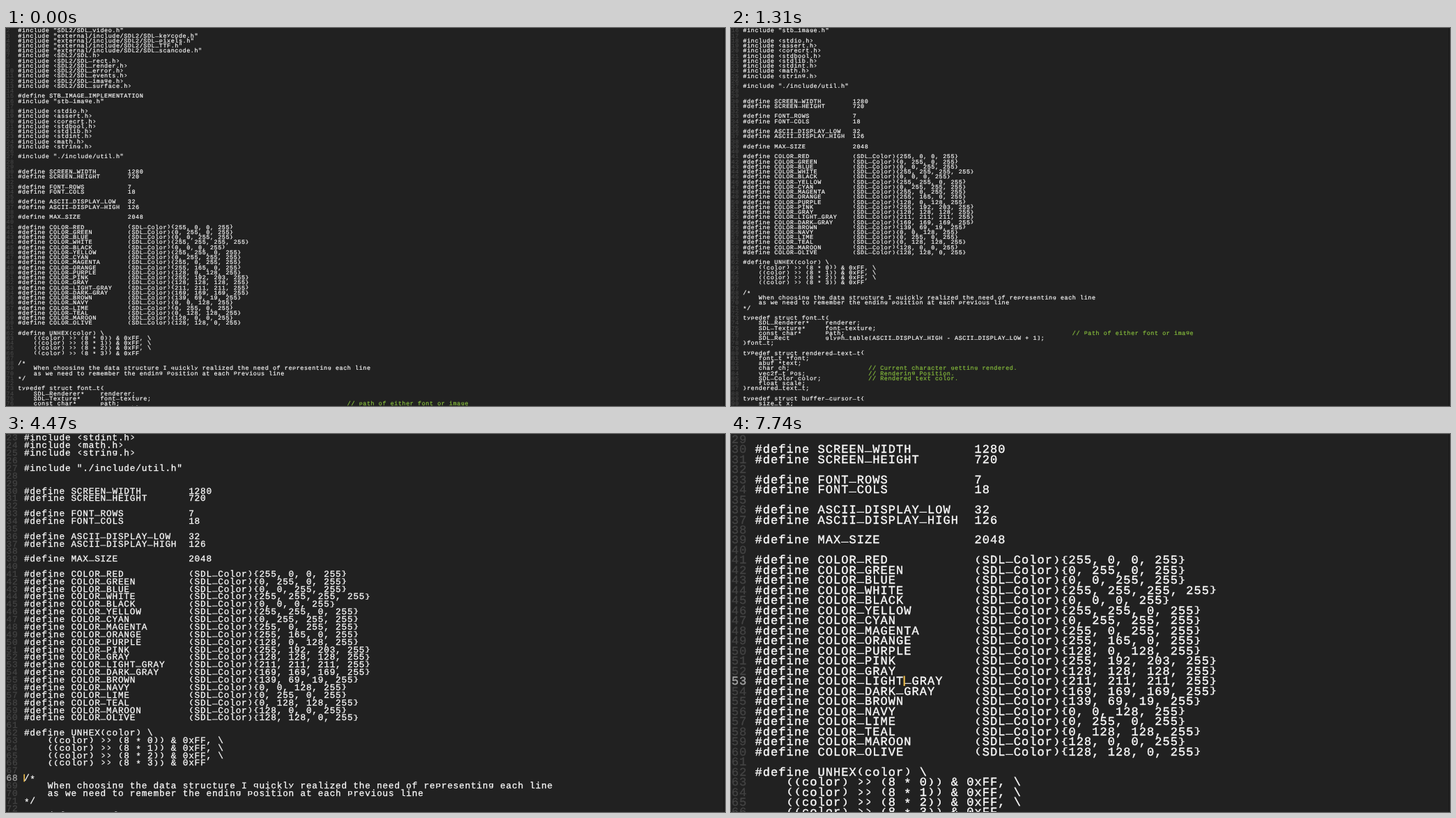
These frames come from a looping animation (1032 px wide and 543 px high, 8000 ms). An HTML page:

```html
<!DOCTYPE html>
<html lang="en">
<head>
<meta charset="utf-8">
<title>Code editor</title>
<style>
@property --zoom { syntax: "<number>"; inherits: true; initial-value: 1; }
@property --top { syntax: "<integer>"; inherits: true; initial-value: 2; }
@property --gutter { syntax: "<integer>"; inherits: true; initial-value: 3; }
@property --row { syntax: "<integer>"; inherits: true; initial-value: 98; }
@property --col { syntax: "<integer>"; inherits: true; initial-value: 0; }

html, body { margin: 0; width: 100%; height: 100%; overflow: hidden; background: #212121; }

/* The sheet is laid out at ten times the smallest zoom, then scaled down. */
#stage {
  --w: 56.25px;
  --h: 72.4px;
  position: absolute;
  inset: 0;
  overflow: hidden;
  animation: zoom 8s step-end infinite, scroll 8s step-end infinite, gutter 8s step-end infinite,
    row 8s step-end infinite, col 8s step-end infinite;
}
#stage::after {
  content: "";
  position: absolute;
  inset: 0 1px 0 auto;
  width: 1px;
  background: #181818;
}
#sheet {
  position: absolute;
  left: 0;
  top: 0;
  transform-origin: 0 0;
  transform: scale(calc(var(--zoom) / 10)) translateY(calc((1 - var(--top)) * var(--h)));
  font: 85px "Liberation Mono", monospace;
  font-variant-ligatures: none;
  line-height: var(--h);
  letter-spacing: calc(var(--w) - 1ch);
  text-rendering: geometricPrecision;
  white-space: pre;
  color: #fafafa;
  -webkit-text-stroke: 2px;
}
#sheet > * { position: absolute; margin: 0; left: 0; top: 0; font: inherit; line-height: inherit; }
#numbers, #code, #current { padding: 5px 0 0 4px; }
#sheet #code { left: calc(var(--gutter) * var(--w)); }
#numbers { color: #434343; }
#sheet #current { top: calc((var(--row) - 1) * var(--h)); color: #a0a0a0; }
#current::before { counter-reset: row var(--row); content: counter(row); }
#sheet #cursor {
  left: calc((var(--gutter) + var(--col)) * var(--w));
  top: calc((var(--row) - 1) * var(--h));
  width: 11px;
  height: var(--h);
  background: #e8b84a;
}

/* Glyphs kept between cap height and baseline. */
#code i { display: inline-block; font-style: normal; }
.note { color: #86bd3c; }
.tail { transform-origin: 50% 19%; transform: scaleY(.72); }
.low { transform: translateY(-.17em); }
.star { transform: translateY(.14em); }
.tall { transform-origin: 50% 22.5%; transform: scaleY(.71); }
.angle { transform: scaleX(.62); }

@keyframes zoom {
  0% { --zoom: 1; } 55.875% { --zoom: 1.5; } 62.625% { --zoom: 2; }
}
@keyframes scroll {
  0% { --top: 2; } 6.25% { --top: 3; } 11.5% { --top: 4; } 13.375% { --top: 8; }
  14.875% { --top: 12; } 16.375% { --top: 16; } 18.25% { --top: 20; } 20% { --top: 23; }
  62.625% { --top: 29; }
}
@keyframes gutter {
  0% { --gutter: 3; } 20% { --gutter: 4; } 55.875% { --gutter: 3; }
}
@keyframes row {
  0% { --row: 98; } 34.125% { --row: 97; } 39.125% { --row: 96; } 40.875% { --row: 92; }
  42.375% { --row: 88; } 43.875% { --row: 84; } 45.375% { --row: 80; } 47.25% { --row: 76; }
  48.75% { --row: 72; } 50.625% { --row: 68; } 69.125% { --row: 66; } 75.75% { --row: 63; }
  77.625% { --row: 58; } 79.375% { --row: 54; } 81.125% { --row: 53; }
}
@keyframes col {
  0% { --col: 0; } 81.125% { --col: 1; } 84.375% { --col: 2; } 89.625% { --col: 3; }
  91.25% { --col: 7; } 93.125% { --col: 11; } 94.625% { --col: 15; } 96.75% { --col: 19; }
}
</style>
</head>
<body>
<div id="stage"><div id="sheet"><pre id="numbers"></pre><pre id="code">

#include "SDL2/SDL_video.h"
#include "external/include/SDL2/SDL_keycode.h"
#include "external/include/SDL2/SDL_pixels.h"
#include "external/include/SDL2/SDL_TTF.h"
#include "external/include/SDL2/SDL_scancode.h"
#include &lt;SDL2/SDL.h>
#include &lt;SDL2/SDL_rect.h>
#include &lt;SDL2/SDL_render.h>
#include &lt;SDL2/SDL_error.h>
#include &lt;SDL2/SDL_events.h>
#include &lt;SDL2/SDL_image.h>
#include &lt;SDL2/SDL_surface.h>

#define STB_IMAGE_IMPLEMENTATION
#include "stb_image.h"

#include &lt;stdio.h>
#include &lt;assert.h>
#include &lt;corecrt.h>
#include &lt;stdbool.h>
#include &lt;stdlib.h>
#include &lt;stdint.h>
#include &lt;math.h>
#include &lt;string.h>

#include "./include/util.h"


#define SCREEN_WIDTH        1280
#define SCREEN_HEIGHT       720

#define FONT_ROWS           7
#define FONT_COLS           18

#define ASCII_DISPLAY_LOW   32
#define ASCII_DISPLAY_HIGH  126

#define MAX_SIZE            2048

#define COLOR_RED           (SDL_Color){255, 0, 0, 255}
#define COLOR_GREEN         (SDL_Color){0, 255, 0, 255}
#define COLOR_BLUE          (SDL_Color){0, 0, 255, 255}
#define COLOR_WHITE         (SDL_Color){255, 255, 255, 255}
#define COLOR_BLACK         (SDL_Color){0, 0, 0, 255}
#define COLOR_YELLOW        (SDL_Color){255, 255, 0, 255}
#define COLOR_CYAN          (SDL_Color){0, 255, 255, 255}
#define COLOR_MAGENTA       (SDL_Color){255, 0, 255, 255}
#define COLOR_ORANGE        (SDL_Color){255, 165, 0, 255}
#define COLOR_PURPLE        (SDL_Color){128, 0, 128, 255}
#define COLOR_PINK          (SDL_Color){255, 192, 203, 255}
#define COLOR_GRAY          (SDL_Color){128, 128, 128, 255}
#define COLOR_LIGHT_GRAY    (SDL_Color){211, 211, 211, 255}
#define COLOR_DARK_GRAY     (SDL_Color){169, 169, 169, 255}
#define COLOR_BROWN         (SDL_Color){139, 69, 19, 255}
#define COLOR_NAVY          (SDL_Color){0, 0, 128, 255}
#define COLOR_LIME          (SDL_Color){0, 255, 0, 255}
#define COLOR_TEAL          (SDL_Color){0, 128, 128, 255}
#define COLOR_MAROON        (SDL_Color){128, 0, 0, 255}
#define COLOR_OLIVE         (SDL_Color){128, 128, 0, 255}

#define UNHEX(color) \
    ((color) >> (8 * 0)) &amp; 0xFF, \
    ((color) >> (8 * 1)) &amp; 0xFF, \
    ((color) >> (8 * 2)) &amp; 0xFF, \
    ((color) >> (8 * 3)) &amp; 0xFF

/*
    When choosing the data structure I quickly realized the need of representing each line
    as we need to remember the ending position at each previous line
*/

typedef struct font_t{
    SDL_Renderer*    renderer;
    SDL_Texture*     font_texture;
    const char*      path;                                                          // path of either font or image
    SDL_Rect         glyph_table[ASCII_DISPLAY_HIGH - ASCII_DISPLAY_LOW + 1];
}font_t;

typedef struct rendered_text_t{
    font_t *font;
    abuf *text;
    char ch;                    // Current character getting rendered.
    vec2f_t pos;                // Rendering Position.
    SDL_Color color;            // Rendered text color.
    float scale;
}rendered_text_t;

typedef struct buffer_cursor_t{
    size_t x;
    size_t y;
}buffer_cursor_t;

typedef struct line_t{
    size_t size;
    char *data;
    size_t screen_row_end;
</pre><div id="current"></div><div id="cursor"></div></div></div>
<script>
const code = document.getElementById("code");
const lines = code.textContent.split("\n");
const shapes = { tail: "gpqy", low: "_", star: "*", tall: "(){}[]", angle: "<>" };
const entities = { "<": "&lt;", ">": "&gt;", "&": "&amp;" };

function glyph(c) {
  const shape = Object.keys(shapes).find(name => shapes[name].includes(c));
  const text = entities[c] || c;
  return shape ? `<i class="${shape}">${text}</i>` : text;
}

const markup = text => [...text].map(glyph).join("");

code.innerHTML = lines.map(line => {
  const at = line.indexOf("// ");
  if (at < 0) return markup(line);
  return `${markup(line.slice(0, at))}<span class="note">${markup(line.slice(at))}</span>`;
}).join("\n");

document.getElementById("numbers").textContent = lines.map((_, i) => i + 1).join("\n");
</script>
</body>
</html>
```
